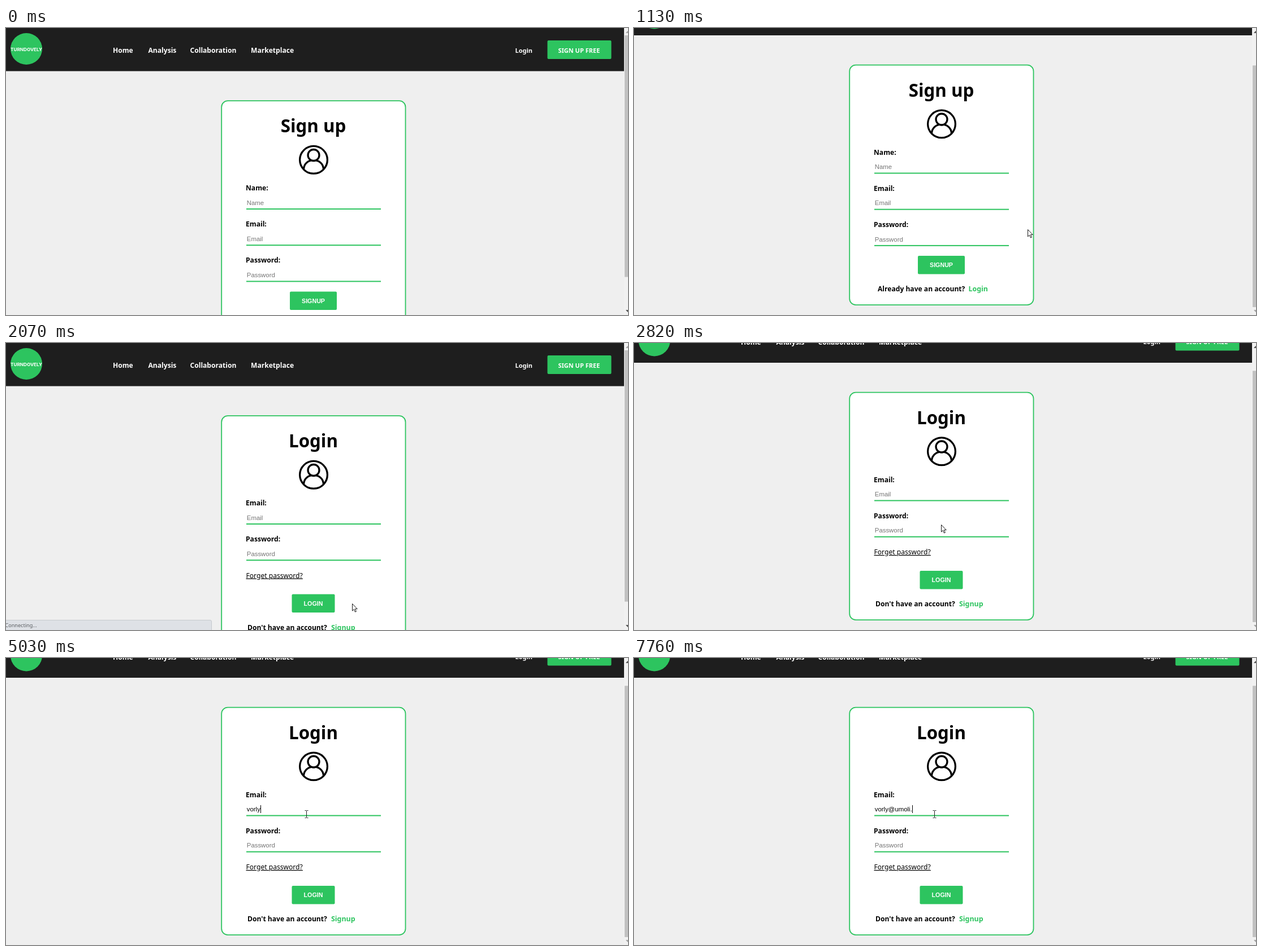
An HTML page for the animation above (8 s loop, 1100 by 509 pixels).

```html
<!DOCTYPE html>
<html lang="en">
<head>
<meta charset="utf-8">
<title>Sign up and log in</title>
<style>
  html, body { margin: 0; width: 100%; height: 100%; overflow: hidden; background: #efefef; }
  svg { display: block; }
  text { font: 700 12.1px "Noto Sans", "Open Sans", sans-serif; white-space: pre; }
  .title { font-size: 31.3px; text-anchor: middle; }
  .nav { fill: #fff; }
  .small { font-size: 11px; fill: #fff; }
  .button { font: 700 10.7px "Liberation Sans", Arial, sans-serif; fill: #fff; text-anchor: middle; }
  .hint, .typed { font: 400 11.4px "Liberation Sans", Arial, sans-serif; fill: #757575; }
  .typed { fill: #000; }
  .link { font-size: 12.4px; fill: #2dc45f; }
  .forgot { font-weight: 400; text-decoration: underline; }
  .brand { font: 700 8.2px Inter, sans-serif; fill: #fff; text-anchor: middle; }
  .status { font-weight: 400; font-size: 9.1px; fill: #5a5d61; }
</style>
</head>
<body>
<svg id="stage" width="1100" height="509" viewBox="0 0 1100 509"></svg>
<script>
const GREEN = '#2dc45f';
const LOOP = 8000;

const text = (x, y, str, cls = '', id = '') =>
  `<text x="${x}" y="${y}" class="${cls}" id="${id}">${str}</text>`;
const rect = (x, y, w, h, fill, extra = '') =>
  `<rect x="${x}" y="${y}" width="${w}" height="${h}" fill="${fill}" ${extra}/>`;

const header = rect(0, 0, 1093, 76.5, '#1e1e1e') +
  `<circle cx="36" cy="37" r="28" fill="${GREEN}"/>` +
  text(36, 40.5, 'TURNDOVELY', 'brand') +
  text(189, 44, 'Home', 'nav') + text(251.5, 44, 'Analysis', 'nav') +
  text(325.5, 44, 'Collaboration', 'nav') + text(433, 44, 'Marketplace', 'nav') +
  text(900.5, 43.5, 'Login', 'small') +
  rect(957.5, 22, 113, 33, GREEN, 'rx="2"') + text(976.5, 43.5, 'SIGN UP FREE', 'small');

const avatar = `<g fill="none" stroke="#000" stroke-width="3.3">
  <path d="M526.5 250.5C527 229 561 229 561.5 250.5"/>
  <circle cx="544" cy="225.5" r="10" fill="#fff"/>
  <circle cx="544" cy="233.8" r="24.4"/></g>`;

const field = (name, row) => {
  const y = row * 64.2;
  return text(424, 288 + y, name + ':') +
    text(425.8, 313.7 + y, name, 'hint', 'hint' + row) +
    rect(425, 320 + y, 238, 2, GREEN);
};

const page = (id, title, bottom, fields, rest) => `<g id="${id}">${header}
  ${rect(381.2, 129.2, 325.3, bottom - 129.2, '#fff', `rx="11" stroke="${GREEN}" stroke-width="1.8"`)}
  ${text(543.5, 185, title, 'title')}${avatar}${fields.map(field).join('')}${rest}</g>`;

const stage = document.getElementById('stage');
stage.innerHTML = rect(0, 0, 1100, 509, '#efefef') +
  page('signup', 'Sign up', 554.6, ['Name', 'Email', 'Password'],
    rect(502, 467.5, 83, 32.5, GREEN, 'rx="2"') + text(543.5, 487.7, 'SIGNUP', 'button') +
    text(431, 530.5, 'Already have an account?') + text(591.5, 530.5, 'Login', 'link')) +
  page('login', 'Login', 532.6, ['Email', 'Password'],
    text(424.5, 416.5, 'Forget password?', 'forgot') +
    rect(505.5, 445.5, 76, 32.5, GREEN, 'rx="2"') + text(543.5, 465.7, 'LOGIN', 'button') +
    text(427, 508.5, "Don't have an account?") + text(575, 508.5, 'Signup', 'link') +
    text(425.8, 313.7, '', 'typed', 'typed') + rect(427, 302.5, 1, 14, '#000', 'id="caret"')) +
  rect(1093, 0, 7, 509, '#f1f1f1') + rect(1094, 13, 6, 400, '#c1c1c1', 'id="thumb"') +
  `<path id="up" d="M1096 9l3.5-4 3.5 4z"/><path id="down" d="M1096 500h7l-3.5 4z"/>
  <g id="status"><path d="M-1 491.5H361q2.5 0 2.5 2.5V510H-1z" fill="#dee1e6" stroke="#c6cace"/>
  ${text(-1.5, 503.7, 'Connecting...', 'status')}</g>
  <path id="arrow" d="M.5 .5V13L3.4 10.3 5.4 15 7.4 14.1 5.4 9.6H9.2z" fill="#fff" stroke="#000" stroke-width=".9"/>
  <path id="beam" d="M-3-6.5h2q1 0 1 1 0-1 1-1h2M0-5.5V5.5M-3 6.5h2q1 0 1-1 0 1 1 1h2" fill="none" stroke="#222"/>`;

const el = id => document.getElementById(id);
const show = (id, on) => el(id).style.display = on ? '' : 'none';

// Pointer moves: start time, step length, first step, last step, from, to
const moves = [
  [130, 77, 0, 7, [912, 479], [696, 357]],
  [1130, 68.5, 0, 7, [696, 357], [612, 462]],
  [2290, 82.5, 1, 5, [612, 462], [543, 322]],
  [2820, 90, 0, 5, [543, 322], [531, 277]]
];

function pointerAt(t) {
  const move = moves.filter(m => t >= m[0]).pop();
  if (!move) return null;
  const [start, step, first, last, from, to] = move;
  const p = Math.min(1, (first + Math.floor((t - start) / step)) / last);
  const ease = p * p * (3 - 2 * p);
  return from.map((v, i) => Math.round(v + (to[i] - v) * ease));
}

const FOCUS = 3240, BLINK = 530;
const typing = 'vorly@umoli.';
const keyTimes = [3970, 4300, 4430, 4900, 5030, 5890, 6420, 6750, 6880, 7280, 7560, 7760];

function render(t) {
  const onLogin = t >= 2070;
  const maxScroll = onLogin ? 41.5 : 63.5;
  const scroll = t >= (onLogin ? 2820 : 1130) ? maxScroll : 0;
  show('signup', !onLogin);
  show('login', onLogin);
  el(onLogin ? 'login' : 'signup').setAttribute('transform', `translate(0 ${-scroll})`);

  const thumbHeight = 482 * 509 / (509 + maxScroll);
  el('thumb').setAttribute('height', thumbHeight);
  el('thumb').setAttribute('y', scroll ? 495 - thumbHeight : 13);
  el('up').setAttribute('fill', scroll ? '#505050' : '#a3a3a3');
  el('down').setAttribute('fill', scroll ? '#a3a3a3' : '#505050');

  show('status', t >= 1810 && t < 2550);
  el('status').style.opacity = Math.min(1, (2550 - t) / 260);

  const pressed = keyTimes.filter(k => t >= k);
  const typed = el('typed');
  typed.textContent = typing.slice(0, pressed.length);
  el('login').querySelector('#hint0').style.display = pressed.length ? 'none' : '';
  const lastKey = pressed.length ? pressed[pressed.length - 1] : FOCUS;
  show('caret', t >= FOCUS && Math.floor((t - lastKey) / BLINK) % 2 === 0);
  const width = pressed.length ? typed.getComputedTextLength() : 0;
  el('caret').setAttribute('x', Math.max(427, Math.round(426.3 + width)));

  const pos = pointerAt(t);
  const overField = pos && t > 2820 && pos[1] <= 281;
  show('arrow', pos && !overField);
  show('beam', overField);
  if (pos) el('arrow').setAttribute('transform', `translate(${pos})`);
  if (overField) el('beam').setAttribute('transform', `translate(${pos[0] + .5} ${pos[1]})`);
}

function tick() {
  render(performance.now() % LOOP);
  requestAnimationFrame(tick);
}
tick();
</script>
</body>
</html>
```
